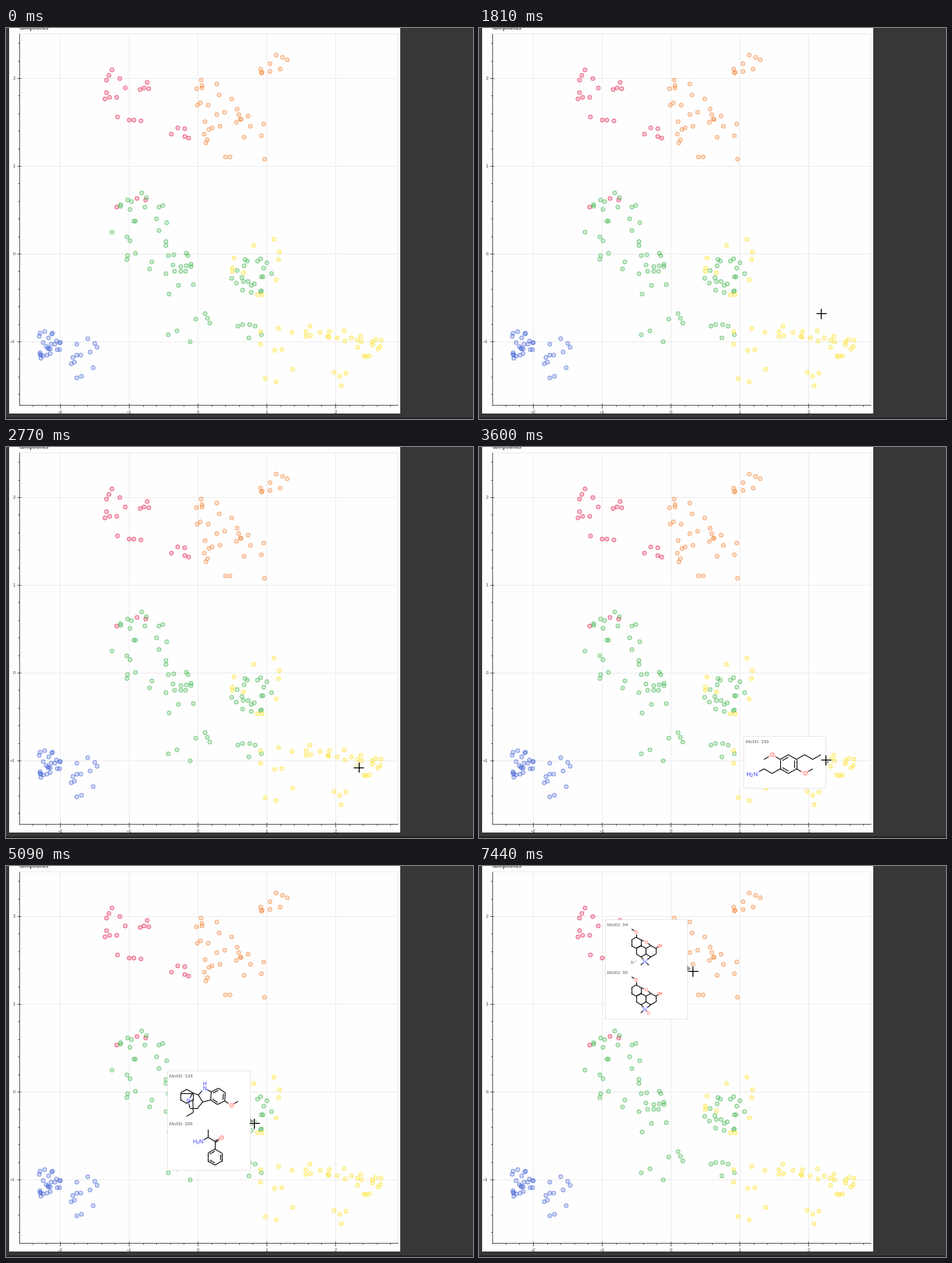
Write a matplotlib script that moves like this. It is 597 px wide and 499 px high and loops after 8000 ms.

```python
import numpy as np
import matplotlib.pyplot as plt
from matplotlib.animation import FuncAnimation
from matplotlib.collections import LineCollection
from matplotlib.patches import Polygon, Rectangle

W, H, DPI = 597, 499, 64
PX = 72 / DPI
STEP, LOOP = 25, 8000
INK = {"C": "#111111", "O": "#ff3b30", "OH": "#ff3b30", "N": "#3333ff", "H$_2$N": "#3333ff",
       "Br": "#8b5a2b", "Cl": "#22cc22", "I": "#a020d0"}

plt.rcParams["font.family"] = "Liberation Sans"
fig = plt.figure(figsize=(W / DPI, H / DPI), dpi=DPI, facecolor="#373737")
ax = fig.add_axes([0, 0, 1, 1])
ax.set(xlim=(0, W), ylim=(H, 0))
ax.axis("off")


def box(x, y, w, h, color, edge="none", z=0):
    return ax.add_patch(Rectangle((x, y), w, h, fc=color, ec=edge, lw=0.8 * PX, zorder=z))


def lines(segs, colors, width=1.0, z=1):
    return ax.add_collection(
        LineCollection(segs, colors=colors, linewidths=width * PX, zorder=z), autolim=False)


def text(x, y, s, size=6, color="#444444", ha="center", z=3, **kw):
    return ax.text(x, y, s, fontsize=size * PX, color=color, ha=ha,
                   va=kw.pop("va", "center_baseline"), zorder=z, **kw)


# Page and axes
box(0, 497, W, 2, "#222222")
box(4, 0, 500, 492, "#fefefe")
box(17, 7, 483, 474, "none", "#e8e8e8")
text(17, 2, "Compounds", 6.5, ha="left", weight="bold", va="baseline")

grid, ticks = [], [[(17, 7), (17, 482)], [(17, 481), (501, 481)]]
for i in range(-12, 15):
    x, major = round(245 + 88 * i / 5), i % 5 == 0
    ticks.append([(x, 479 if major else 481), (x, 485 if major else 483)])
    if major:
        grid.append([(x, 7), (x, 481)])
        text(x, 489.5, str(i // 5).replace("-", "−"))
for i in range(-8, 13):
    y, major = round(288 - 112 * i / 5), i % 5 == 0
    ticks.append([(14 if major else 15, y), (19 if major else 17, y)])
    if major:
        grid.append([(18, y), (500, y)])
        text(12, y, str(i // 5).replace("-", "−"), ha="right")
lines(grid, "#eeeeee")
lines(ticks, "#555555", 0.9)

# Compound clusters as ellipses: count, centre, radii
CLUSTERS = {
    "#e6194b": [(17, 154, 88, 30, 45), (5, 226, 134, 22, 8), (3, 155, 222, 40, 20)],
    "#f58231": [(9, 341, 45, 20, 20), (18, 277, 95, 40, 45), (14, 300, 142, 50, 48)],
    "#3cb44b": [(23, 171, 255, 40, 45), (18, 217, 313, 36, 28), (22, 313, 314, 26, 26),
                (7, 220, 385, 48, 40), (6, 310, 388, 20, 12)],
    "#ffe119": [(11, 320, 300, 32, 55), (9, 352, 412, 34, 45), (12, 412, 388, 36, 14),
                (13, 463, 404, 18, 18), (4, 425, 443, 22, 14)],
    "#4363d8": [(25, 53, 405, 18, 20), (13, 98, 422, 24, 28)],
}
rng = np.random.default_rng(4)
for color, blobs in CLUSTERS.items():
    xs, ys = [], []
    for count, cx, cy, rx, ry in blobs:
        radius, angle = np.sqrt(rng.random(count)), rng.uniform(0, 2 * np.pi, count)
        xs.extend(cx + rx * radius * np.cos(angle))
        ys.extend(cy + ry * radius * np.sin(angle))
    ax.scatter(xs, ys, s=(5 * PX) ** 2, fc=(color, 0.22), ec=(color, 0.75),
               lw=0.8 * PX, zorder=2)


def polar(p, angle, length):
    a = np.radians(angle)
    return np.array(p) + length * np.array([np.cos(a), np.sin(a)])


class Card:
    """Hover card with one molecule per row."""

    def __init__(self, x, y, w, h, ids, arrow_y, start, end):
        self.start, self.end = start, end
        self.segs, self.colors = [], []
        self.parts = [box(x, y, w, h, "white", "#e4e4e4", 5)]
        tip = [(x + w, arrow_y - 4), (x + w + 5, arrow_y), (x + w, arrow_y + 4)]
        self.parts.append(ax.add_patch(Polygon(tip, fc="#999999", zorder=5)))
        for row, number in enumerate(ids):
            self.label(x + 3, y + 7 + 61 * row, f"MolID: {number}", "#666666", 6.1, "left")

    def label(self, x, y, s, color, size, ha="center"):
        self.parts.append(text(x, y, s, size, color, ha, z=7))

    def bond(self, p, q, a="C", b="C"):
        """Two-coloured bond that stops short of labelled atoms."""
        p, q = np.array(p, float), np.array(q, float)
        start = p if a == "C" else p + 0.34 * (q - p)
        end = q if b == "C" else q + 0.34 * (p - q)
        self.segs += [[start, (p + q) / 2], [(p + q) / 2, end]]
        self.colors += [INK[a], INK[b]]

    def atom(self, p, symbol, size):
        if symbol == "H$_2$N":
            self.label(p[0] + 3, p[1], symbol, INK[symbol], size, "right")
        elif symbol != "C":
            self.label(*p, symbol, INK[symbol], size)

    def arm(self, p, *steps, length=10, size=7, last="C"):
        """Walk a chain of (angle, symbol) steps and return its end."""
        for angle, symbol in steps:
            q = polar(p, angle, length)
            self.bond(p, q, last, symbol)
            self.atom(q, symbol, size)
            p, last = q, symbol
        return p

    def ring(self, center, r, turn=0, aromatic=False):
        pts = [polar(center, turn - 90 + 60 * k, r) for k in range(6)]
        for k in range(6):
            self.bond(pts[k], pts[(k + 1) % 6])
            if aromatic and k % 2:
                inner = [center + 0.74 * (pts[j % 6] - center) for j in (k, k + 1)]
                self.bond(*inner)
        return pts

    def finish(self):
        self.parts.append(lines(self.segs, self.colors, 1.1, 6))


def phenethylamine(card, center, r, *group):
    v = card.ring(np.array(center), r, aromatic=True)
    style = dict(length=r, size=7.6)
    card.arm(v[5], (210, "O"), (150, "C"), **style)
    card.arm(v[2], (30, "O"), (-30, "C"), **style)
    card.arm(v[4], (150, "C"), (210, "C"), (150, "H$_2$N"), **style)
    card.arm(v[1], *group, **style)


def indole_cage(card):
    benzo = card.ring(np.array((271, 294)), 10.4, 4, True)
    card.arm(benzo[2], (34, "O"), (-30, "C"), size=6.5)
    hub = polar((271, 294), 184, 16.2)
    left, n, low = (polar(hub, a, 9) for a in (184, 262, 112))
    card.bond(benzo[5], n, "C", "N")
    card.bond(n, left, "N")
    card.bond(left, low)
    card.bond(low, benzo[4])
    card.atom(n, "N", 6.5)
    card.label(n[0], n[1] - 6, "H", INK["N"], 6.5)
    cage, amine = card.ring(np.array((231, 294)), 9), np.array((233, 300))
    card.bond(left, cage[1])
    card.bond(cage[5], cage[1])
    elbow = card.arm(low, (130, "C"), (180, "C"))
    card.bond(elbow, amine, "C", "N")
    card.bond(amine, cage[1], "N")
    card.atom(amine, "N", 6.5)
    ethyl = card.arm(cage[2], (88, "C"), length=16)
    card.arm(ethyl, (150, "C"))


def aminoketone(card):
    v = card.ring(np.array((267, 371.5)), 10.2, aromatic=True)
    carbonyl = card.arm(v[0], (-90, "C"))
    card.arm(carbonyl, (-30, "O"))
    card.bond(carbonyl + (0, 1.8), polar(carbonyl, -30, 10) + (0, 1.8), "C", "O")
    alpha = card.arm(carbonyl, (210, "C"))
    card.arm(alpha, (-90, "C"))
    card.arm(alpha, (150, "H$_2$N"))


def morphinan(card, y):
    r = 7.2
    shift = r * np.sqrt(3) / 2
    centers = np.array([(201, y), (201 + shift, y + 1.5 * r), (201 + 3 * shift, y + 1.5 * r)])
    benzo, mid, right = (card.ring(c, r, aromatic=c is centers[0]) for c in centers)
    style = dict(length=6.8, size=5)
    card.arm(benzo[0], (-90, "O"), (210, "C"), **style)
    ether = card.arm(benzo[1], (20, "O"), **style)
    card.bond(ether, right[0], "O")
    card.arm(right[1], (-30, "OH"), **style)
    n = np.array((212, y + 24))
    for v in (mid[3], right[3]):
        card.bond(v, n, "C", "N")
    card.atom(n, "N", 5.5)
    card.arm(n, (140, "C"), last="N", **style)
    return n


halides = Card(340, 302, 105, 188, (116, 153, 154), 397, 2290, 2410)
for row, symbol in enumerate(("Br", "Cl", "I")):
    phenethylamine(halides, (404.3, 337 + 61 * row), 13.5, (-30, symbol))

propyl = Card(338, 369, 105, 66, (159,), 402, 2880, 3660)
phenethylamine(propyl, (395.5, 404.7), 12, (-30, "C"), (30, "C"), (-30, "C"))

alkaloids = Card(206, 261, 106, 127, (134, 206), 326, 5030, 6460)
indole_cage(alkaloids)
aminoketone(alkaloids)

opioids = Card(161, 68, 105, 127, (94, 95), 131, 7330, LOOP)
nitrogen = morphinan(opioids, 98)
opioids.arm(nitrogen, (40, "C"), length=6.8, last="N")
opioids.label(nitrogen[0] - 14, nitrogen[1], "Br$^-$", "#777777", 4.6)
opioids.arm(morphinan(opioids, 159), (45, "O"), length=6.8, size=5, last="N")

cards = [halides, propyl, alkaloids, opioids]
for card in cards:
    card.finish()

# Pointer stops: arrive, leave, x, y
STOPS = np.array([
    (50, 50, 558, 298), (260, 490, 534, 217), (700, 1200, 464, 185), (1810, 2000, 437, 364),
    (2350, 2350, 451, 400.6), (2470, 2720, 452, 410), (3000, 3640, 443, 399),
    (4250, 4920, 315, 330), (5090, 6410, 317, 328), (6580, 6580, 335, 262),
    (6750, 6750, 327, 194), (7210, 7230, 278, 138), (7440, LOOP, 273, 134)])
TIMES = STOPS[:, :2].ravel()
ARROW = np.array([(0, 0), (0, 14), (3.2, 11), (5.4, 16), (7.6, 15), (5.5, 10.2), (10, 10)])
CROSS = np.array([[(-6.5, 0), (6.5, 0)], [(0, -6.5), (0, 6.5)]])

arrow = ax.add_patch(Polygon(ARROW, fc="black", ec="white", lw=0.8 * PX, zorder=9))
halo = lines(CROSS, "white", 2.6, 8)
cross = lines(CROSS, "black", 1.2, 9)


def draw(i):
    t = i * STEP + 15
    x, y = (np.interp(t, TIMES, np.repeat(STOPS[:, k], 2)) for k in (2, 3))
    on_page = x < 504
    arrow.set_visible(t >= 50 and not on_page)
    arrow.set_xy(ARROW + (x, y))
    for mark in (halo, cross):
        mark.set_visible(on_page)
        mark.set_segments(CROSS + (x + 0.4, y + 0.4))
    for card in cards:
        for part in card.parts:
            part.set_visible(card.start <= t < card.end)
    return []


anim = FuncAnimation(fig, draw, frames=LOOP // STEP, interval=STEP, repeat=True,
                     repeat_delay=0, blit=False)
plt.show()
```
